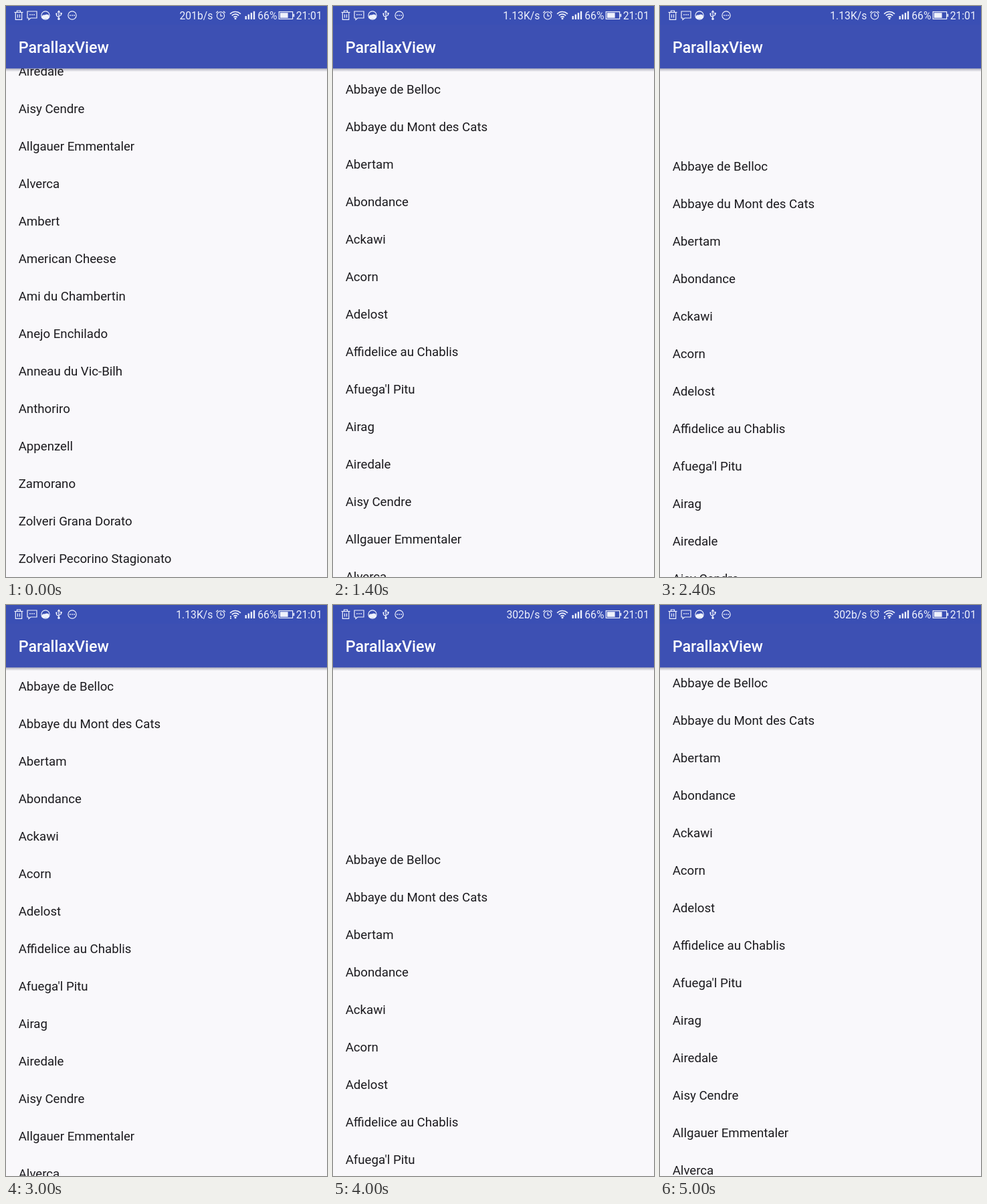
An HTML page with a canvas for the animation above (5.2 s loop, 480 px wide and 853 px high).

```html
<!DOCTYPE html>
<html lang="en">
<head>
<meta charset="utf-8">
<title>ParallaxView</title>
<style>
  html, body { margin: 0; width: 100%; height: 100%; overflow: hidden; background: #f9f8fb; }
  canvas { display: block; }
</style>
</head>
<body>
<canvas id="stage" width="480" height="853"></canvas>
<script>
const ctx = document.getElementById('stage').getContext('2d');
const W = 480, H = 853, BAR = 93.3, ROW = 56;
const LOOP = 5200, STEP = 200;
const INK = '#eef1fc', BLUE = '#3d50b3';

const cheeses = [
  'Abbaye de Belloc', 'Abbaye du Mont des Cats', 'Abertam', 'Abondance', 'Ackawi',
  'Acorn', 'Adelost', 'Affidelice au Chablis', "Afuega'l Pitu", 'Airag', 'Airedale',
  'Aisy Cendre', 'Allgauer Emmentaler', 'Alverca', 'Ambert', 'American Cheese',
  'Ami du Chambertin', 'Anejo Enchilado', 'Anneau du Vic-Bilh', 'Anthoriro',
  'Appenzell', 'Zamorano', 'Zolveri Grana Dorato', 'Zolveri Pecorino Stagionato'
];

// Centre of the first row: fling to the top, then two pulls with spring-back.
const scrollKeys = [
  [0, -462], [600, -462], [800, -410], [1000, -210], [1200, 20], [1400, 125],
  [1600, 143], [1800, 185], [2000, 253], [2200, 327], [2400, 240], [2600, 131],
  [2800, 122], [3000, 122], [3200, 206], [3400, 272], [3600, 274], [3800, 340],
  [4000, 381], [4200, 435], [4400, 500], [4600, 351], [4800, 122], [5000, 117]
];

function scrollAt(t) {
  const next = scrollKeys.findIndex(key => key[0] > t);
  if (next < 0) return scrollKeys[scrollKeys.length - 1][1];
  const [t0, y0] = scrollKeys[next - 1], [t1, y1] = scrollKeys[next];
  return Math.round(y0 + (y1 - y0) * (t - t0) / (t1 - t0));
}

const networkSpeed = t => t < 400 ? '201b/s' : t < 3200 ? '1.13K/s' : '302b/s';
const wifiActive = t => (t >= 3000 && t < 4000) || t >= 5000;

function text(str, x, y, font, color, align = 'left') {
  ctx.font = font + ' Roboto, sans-serif';
  ctx.fillStyle = color;
  ctx.textAlign = align;
  ctx.fillText(str, x, y);
}

function line(...points) {
  ctx.beginPath();
  points.forEach(([x, y]) => ctx.lineTo(x, y));
  ctx.stroke();
}

function ring(x, y, r, from = 0, to = Math.PI * 2) {
  ctx.beginPath();
  ctx.arc(x, y, r, from, to);
  ctx.stroke();
}

function dot(x, y, r, color = INK) {
  ctx.fillStyle = color;
  ctx.beginPath();
  ctx.arc(x, y, r, 0, Math.PI * 2);
  ctx.fill();
}

function drawLeftIcons() {
  // trash can
  line([12.5, 9.5], [25.5, 9.5]);
  line([16.5, 9], [16.5, 7], [21.5, 7], [21.5, 9]);
  line([14.3, 10], [14.3, 20.3], [23.7, 20.3], [23.7, 10]);
  line([17.5, 12.5], [17.5, 17.5]);
  line([20.5, 12.5], [20.5, 17.5]);

  // message bubble
  ctx.beginPath();
  [[32, 8], [46, 8], [46, 18], [37, 18], [34, 20.5], [34, 18], [32, 18]]
    .forEach(([x, y]) => ctx.lineTo(x, y));
  ctx.closePath();
  ctx.stroke();
  [36, 39, 42].forEach(x => dot(x, 13, 0.9));

  // sun behind cloud
  ring(59, 14, 6.1);
  dot(57, 16.5, 3.2);
  dot(61, 16, 3.6);
  dot(55.2, 17, 2);

  // usb connection
  line([79, 8], [79, 19]);
  line([75.5, 12], [75.5, 14.5], [79, 17]);
  line([82.5, 11], [82.5, 13.5], [79, 15.5]);
  line([77.3, 9.6], [79, 7.2], [80.7, 9.6]);
  dot(79, 19.3, 1.7);
  dot(75.5, 11.8, 1.2);
  ctx.fillRect(81.4, 10, 2.3, 2.3);

  // round chat
  ring(99, 14, 6.1);
  [96, 99, 102].forEach(x => dot(x, 14, 0.9));
}

function drawRightIcons(t) {
  // alarm clock
  ring(321, 14.4, 5.6);
  line([321, 11], [321, 14.8], [323.8, 14.8]);
  line([314.2, 10.3], [317, 7.8]);
  line([325, 7.8], [327.8, 10.3]);

  // wifi
  const up = -Math.PI / 2;
  ctx.lineWidth = 1.7;
  [3.6, 7.2, 10.8].forEach(r => ring(343, 19.3, r, up - 0.82, up + 0.82));
  dot(343, 18.7, 1.5);
  if (wifiActive(t)) {
    dot(336, 17.4, 1.1);
    dot(336, 20, 1.1);
  }

  // signal
  ctx.fillStyle = INK;
  for (let i = 0; i < 4; i++) {
    const h = 5 + i * 2.4;
    ctx.fillRect(357.5 + i * 4.1, 20 - h, 2.4, h);
  }

  // battery
  ctx.lineWidth = 1.2;
  ctx.strokeRect(408.2, 8.6, 20.4, 10.8);
  ctx.fillRect(409.8, 10.2, 11.8, 7.6);
  ctx.fillRect(429.4, 11.8, 1.8, 4.4);
}

function drawBar(t) {
  const shade = ctx.createLinearGradient(0, BAR, 0, BAR + 5);
  shade.addColorStop(0, 'rgba(30,30,60,0.32)');
  shade.addColorStop(1, 'rgba(30,30,60,0)');
  ctx.fillStyle = shade;
  ctx.fillRect(0, 93, W, 6);
  ctx.fillStyle = BLUE;
  ctx.fillRect(0, 0, W, BAR);
  ctx.fillStyle = '#3a4fb4';
  ctx.fillRect(0, 0, W, 28);

  ctx.strokeStyle = INK;
  ctx.lineWidth = 1.2;
  drawLeftIcons();
  drawRightIcons(t);

  const small = '15.7px';
  text(networkSpeed(t), 309.3, 20, small, INK, 'right');
  text('66%', 376.3, 20, small, INK);
  text('21:01', 472.7, 20, small, INK, 'right');
  text('ParallaxView', 18.67, 70, '500 23.33px', '#fff');
}

function draw(t) {
  ctx.fillStyle = '#f9f8fb';
  ctx.fillRect(0, 0, W, H);
  const top = scrollAt(t);
  cheeses.forEach((name, i) => {
    const y = top + i * ROW;
    if (y > 60 && y < H + 20) text(name, 18.67, y + 6, '18.67px', '#1b1a1e');
  });
  drawBar(t);
}

const start = performance.now();
function tick() {
  const t = (performance.now() - start) % LOOP;
  draw(Math.floor(t / STEP) * STEP);
  requestAnimationFrame(tick);
}
tick();
</script>
</body>
</html>
```
